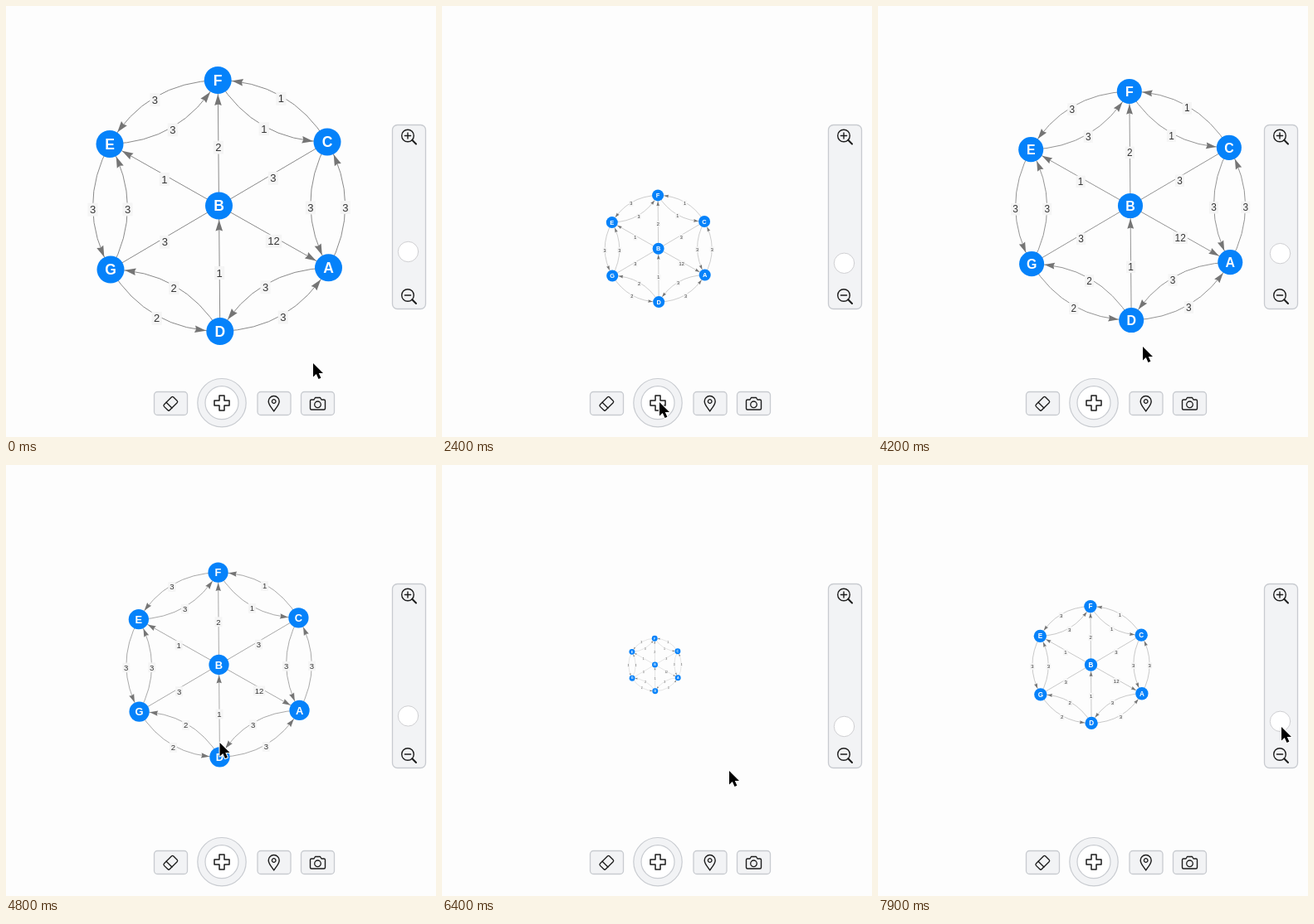
Recreate the animation shown at these times as an HTML page with a canvas. Size 518 by 520 pixels, loop 8 s.

```html
<!DOCTYPE html>
<html lang="en">
<head>
<meta charset="utf-8">
<title>Graph viewer</title>
<style>
html, body { margin: 0; width: 518px; height: 520px; overflow: hidden; background: #fdfdfd; }
canvas { display: block; width: 518px; height: 520px; }
</style>
</head>
<body>
<canvas id="stage"></canvas>
<script>
const canvas = document.getElementById('stage');
const ctx = canvas.getContext('2d');
const dpr = window.devicePixelRatio || 1;
canvas.width = 518 * dpr;
canvas.height = 520 * dpr;

const LOOP = 8000, STEP = 100, RADIUS = 16.5, BEND = 42;
const HOME = [256.5, 241, 1];
const FONT = '"Liberation Sans", Arial, sans-serif';

const nodes = {
  F: [-1.3, -151.5], C: [130.5, -77], A: [132, 74.8], D: [1.3, 151.5],
  G: [-130.5, 77], E: [-131.5, -74.5], B: [0, 0]
};
// from, to, kind (c = curved, s = straight, n = no arrow), weight
const edges = `FEc3 EFc3 CFc1 FCc1 EGc3 GEc3 CAc3 ACc3 DGc2 GDc2 ADc3 DAc3
  BFs2 BEs1 BAs12 DBs1 CBn3 GBn3`.split(/\s+/);

// [time, centre x, centre y, scale]
const view = [
  [0, ...HOME], [800, ...HOME], [1100, 256.5, 241, .233], [1400, 200, 197.5, .233],
  [1600, 196, 210, .233], [1700, 196, 210, .233], [1900, 128, 255, .233],
  [2050, 200, 350, .233], [2200, 262, 310, .233], [2300, 262, 310, .233],
  [2700, ...HOME], [2800, ...HOME], [3000, 256.5, 241, .531], [3200, 256.5, 241, .3],
  [3400, 256.5, 241, .3], [3700, ...HOME], [4000, 440, 241, .655], [4200, 304, 241, .911],
  [4400, ...HOME], [4600, ...HOME], [5000, 256.5, 241, .47], [5500, 65, 241, .47],
  [5600, 110, 241, .6], [6000, ...HOME], [6100, ...HOME], [6400, 256.5, 241, .21],
  [6650, 256.5, 241, .21], [7000, ...HOME], [7550, ...HOME], [7900, 256.5, 241, .465]
];
// [time, pointer x, pointer y]
const pointer = [
  [0, 370, 431], [200, 370, 431], [500, 365, 426], [800, 365, 426], [1100, 335.5, 375.5],
  [1400, 279, 332], [1600, 275, 344], [1700, 275, 344], [1900, 207, 389], [2050, 279, 484],
  [2200, 341, 444], [2400, 262, 478], [2700, 262, 478], [3000, 234, 356], [3200, 234, 356],
  [3400, 245, 428], [3700, 240, 400], [4000, 262, 476], [4200, 319, 411], [4400, 335, 370],
  [4600, 335, 370], [5000, 180, 300], [5500, -12, 300], [5600, 60, 360], [5800, 262, 459],
  [6000, 300, 440], [6200, 340, 372], [6400, 346, 369], [6700, 262, 477], [7100, 262, 477],
  [7300, 300, 470], [7550, 486, 303], [7900, 486, 316]
];
const drags = [[1100, 2200], [5000, 5500]];

function sample(keys, t) {
  let i = keys.findIndex(k => k[0] > t);
  if (i < 0) return keys[keys.length - 1].slice(1);
  const a = keys[i - 1], b = keys[i], p = (t - a[0]) / (b[0] - a[0]);
  return a.slice(1).map((v, j) => v + (b[j + 1] - v) * p);
}

function paint(path, fill, stroke, width = 1) {
  if (fill) { ctx.fillStyle = fill; ctx.fill(path); }
  if (stroke) { ctx.strokeStyle = stroke; ctx.lineWidth = width; ctx.stroke(path); }
}

function circle(x, y, r, fill, stroke, width) {
  const p = new Path2D();
  p.arc(x, y, r, 0, Math.PI * 2);
  paint(p, fill, stroke, width);
}

function box(x, y, w, h, r, fill, stroke, width) {
  const p = new Path2D();
  p.roundRect(x, y, w, h, r);
  paint(p, fill, stroke, width);
}

function at(x, y, draw, angle = 0) {
  ctx.save();
  ctx.translate(x, y);
  ctx.rotate(angle);
  draw();
  ctx.restore();
}

function text(str, x, y, font, color) {
  ctx.font = `${font} ${FONT}`;
  ctx.fillStyle = color;
  ctx.textAlign = 'center';
  ctx.textBaseline = 'alphabetic';
  ctx.fillText(str, x, y);
}

const arrowHead = new Path2D('M0 0L-13.5 4.3L-12 0L-13.5 -4.3Z');

function drawEdge(code) {
  const a = nodes[code[0]], b = nodes[code[1]], kind = code[2], weight = code.slice(3);
  const dx = b[0] - a[0], dy = b[1] - a[1], len = Math.hypot(dx, dy);
  const bend = kind === 'c' ? BEND / len : 0;
  const c = [(a[0] + b[0]) / 2 - dy * bend, (a[1] + b[1]) / 2 + dx * bend];
  const point = t => [0, 1].map(i => (1 - t) ** 2 * a[i] + 2 * t * (1 - t) * c[i] + t * t * b[i]);

  paint(new Path2D(`M${a}Q${c} ${b}`), null, '#8a8a8a');
  if (kind !== 'n') {
    let t = 1;
    while (Math.hypot(point(t)[0] - b[0], point(t)[1] - b[1]) < RADIUS) t -= .004;
    const tip = point(t), tail = point(t - .08);
    at(tip[0], tip[1], () => paint(arrowHead, '#757575'),
      Math.atan2(tip[1] - tail[1], tip[0] - tail[0]));
  }
  const [x, y] = point(.5), w = weight.length * 7.2 + 5;
  const ly = y + (bend ? 3.3 : 5.3);
  box(x - w / 2, ly - 8, w, 16, 0, '#f5f5f5');
  text(weight, x, ly + 4.6, '13px', '#343434');
}

function drawGraph([x, y, scale]) {
  ctx.save();
  ctx.beginPath();
  ctx.rect(4, 0, 511, 520);
  ctx.clip();
  ctx.translate(x, y);
  ctx.scale(scale, scale);
  edges.forEach(drawEdge);
  for (const name in nodes) {
    const [nx, ny] = nodes[name];
    circle(nx, ny, RADIUS, '#0582fa');
    text(name, nx, ny + 6.3, 'bold 17.5px', '#fff');
  }
  ctx.restore();
}

const PANEL = '#f2f3f5', LINE = '#c8cbd0', INK = '#1c1c1c';
const plusIcon = new Path2D('M-3 -9H3V-3H9V3H3V9H-3V3H-9V-3H-3Z');
const pinIcon = new Path2D('M0 9.5C-2 6 -6.5 2 -6.5 -2.5A6.5 6.5 0 0 1 6.5 -2.5C6.5 2 2 6 0 9.5Z');
const cameraIcon = new Path2D('M-7.5 -5H-4.5L-3 -7.5H3L4.5 -5H7.5Q9 -5 9 -3.5V5.5Q9 7 7.5 7H-7.5Q-9 7 -9 5.5V-3.5Q-9 -5 -7.5 -5Z');

function magnifier(y, isPlus) {
  at(484, y, () => {
    circle(0, 0, 7.3, null, INK, 1.4);
    paint(new Path2D('M-3.6 0H3.6' + (isPlus ? 'M0 -3.6V3.6' : '')), null, INK, 1.4);
    paint(new Path2D('M5.3 5.3L10 10'), null, INK, 2);
  });
}

function drawControls(scale) {
  ctx.lineJoin = ctx.lineCap = 'round';
  box(465.5, 143.5, 40, 222, 6, PANEL, LINE, 1.3);
  magnifier(156.5, true);
  magnifier(349, false);
  circle(484.5, 320.5 - 24 * scale, 12.2, '#fff', '#cfcfd2');

  for (const x of [178.5, 303, 355.5]) box(x, 465.5, 40, 28, 4, PANEL, LINE, 1.3);
  circle(260, 478.7, 29.2, PANEL, LINE, 1.2);
  circle(260, 478.7, 20, '#fff', LINE, 1.2);
  at(260, 479, () => {
    ctx.lineJoin = 'round';
    paint(plusIcon, '#fff', INK, 1.5);
  });
  at(198.3, 479.8, () => {
    box(-8, -4.8, 16, 9.6, 1.8, null, INK, 1.3);
    paint(new Path2D('M-2.5 -4.8V4.8'), null, INK, 1.3);
  }, -Math.PI / 4);
  at(322.7, 479.5, () => {
    paint(pinIcon, null, INK, 1.4);
    circle(0, -2.5, 2.3, null, INK, 1.3);
  });
  at(375.5, 480, () => {
    paint(cameraIcon, null, INK, 1.4);
    circle(0, .8, 3.8, null, INK, 1.3);
  });
}

const arrowCursor = new Path2D('M0 0V16.5L3.8 13L6.5 19L9.4 17.8L6.8 12H12Z');
const handCursor = new Path2D(`M-4.5 7.5C-5 4 -7.5 3 -7.5 0Q-7.5 -2 -5 -1.5V-4
  Q-4.5 -6.5 -2 -5.5Q0 -8 2 -5.8Q4.5 -7 5 -4.5Q7.5 -5 7.5 -2.5C7.5 2 6 3.5 5.5 7.5Z`);

function drawPointer([x, y], dragging) {
  at(x, y, () => {
    ctx.lineJoin = 'round';
    if (dragging) {
      paint(handCursor, '#fff', '#111', 1.3);
      paint(new Path2D('M-2 0V4M1 0V4M4 0V4M-5 -1.5V1.5'), null, '#111', 1.1);
    } else {
      paint(arrowCursor, '#000', '#fff', 2);
      paint(arrowCursor, '#000');
    }
  });
}

function render(now) {
  const t = Math.floor((now % LOOP) / STEP) * STEP;
  const camera = sample(view, t);
  ctx.setTransform(dpr, 0, 0, dpr, 0, 0);
  ctx.fillStyle = '#fdfdfd';
  ctx.fillRect(0, 0, 518, 520);
  drawGraph(camera);
  drawControls(camera[2]);
  drawPointer(sample(pointer, t), drags.some(([from, to]) => t >= from && t <= to));
}

const start = performance.now();
function tick() {
  render(performance.now() - start);
  requestAnimationFrame(tick);
}
tick();
</script>
</body>
</html>
```
